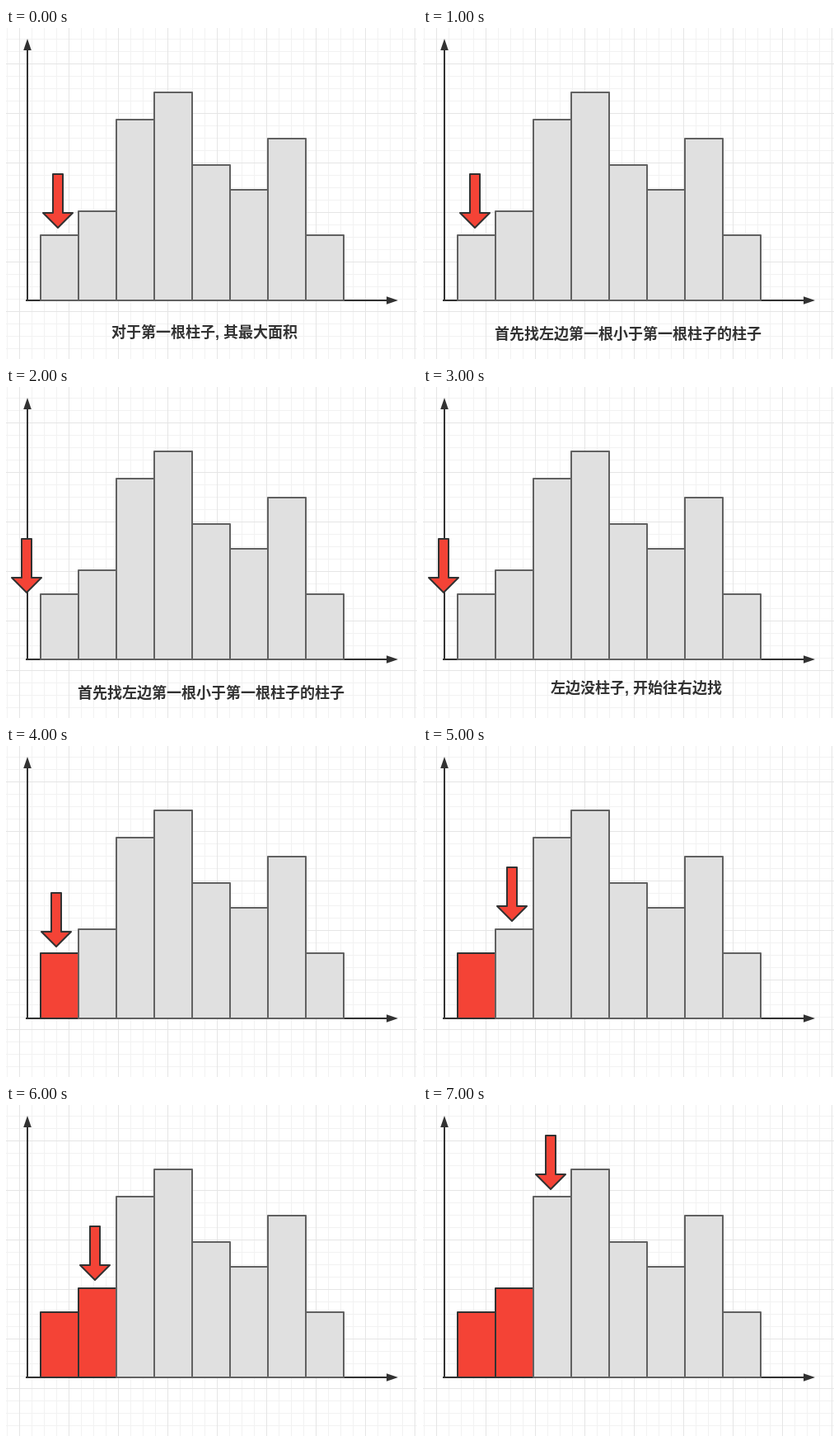
An HTML page with a canvas that plays this animation: 499 by 401 pixels, repeating every 8000 ms.

```html
<!DOCTYPE html>
<html lang="zh-CN">
<head>
<meta charset="utf-8">
<style>
  html, body { margin: 0; width: 100%; height: 100%; overflow: hidden; background: #fff; }
  canvas, svg { position: absolute; left: 0; top: 0; display: block; }
  text { font: bold 18px "Liberation Sans", "Noto Sans CJK SC", "Noto Sans CJK", sans-serif; fill: #323232; }
</style>
</head>
<body>
<canvas id="stage" width="499" height="401"></canvas>
<svg width="499" height="401"><text id="caption"></text></svg>
<script>
const W = 499, H = 401, STEP = 1000;
const INK = '#323232', EDGE = '#616161', GREY = '#e0e0e0', RED = '#f44336';
const BASE = 330, BAR_LEFT = 42, BAR_WIDTH = 46;
const barTops = [251, 222, 111, 78, 166, 196, 134, 251];

const captions = {
  intro: ['对于第一根柱子, 其最大面积', 128, 375],
  left: ['首先找左边第一根小于第一根柱子的柱子', 87, 376.5],
  right: ['左边没柱子, 开始往右边找', 155, 371],
  none: ['', 0, 0]
};

// One scene per second: arrow tip, number of red bars, caption
const scenes = [
  { tip: [63, 242], red: 0, caption: 'intro' },
  { tip: [63, 242], red: 0, caption: 'left' },
  { tip: [25, 249], red: 0, caption: 'left' },
  { tip: [25, 249], red: 0, caption: 'right' },
  { tip: [61, 243], red: 1, caption: 'none' },
  { tip: [108, 212], red: 1, caption: 'none' },
  { tip: [108, 212], red: 2, caption: 'none' },
  { tip: [155, 102], red: 2, caption: 'none' }
];

const ctx = document.getElementById('stage').getContext('2d');
const caption = document.getElementById('caption');

function polygon(points, fill, stroke) {
  ctx.beginPath();
  points.forEach(([x, y]) => ctx.lineTo(x, y));
  ctx.closePath();
  ctx.fillStyle = fill;
  ctx.fill();
  if (stroke) {
    ctx.strokeStyle = stroke;
    ctx.stroke();
  }
}

function drawGrid() {
  const lines = (first, gap, color) => {
    ctx.fillStyle = color;
    for (let x = 16 + first; x < W; x += gap) ctx.fillRect(x, 0, 1, H);
    for (let y = 43 + first; y < H; y += gap) ctx.fillRect(0, y, W, 1);
  };
  lines(-60, 15, '#f2f2f2');
  lines(-60, 60, '#e5e5e5');
}

function drawAxes() {
  ctx.fillStyle = INK;
  ctx.fillRect(25, 25, 2, 306);
  ctx.fillRect(24, 329, 440, 2);
  polygon([[26, 13], [30.8, 27], [21.2, 27]], INK);
  polygon([[476, 330], [462, 334.8], [462, 325.2]], INK);
}

function drawBars(redCount) {
  barTops.forEach((top, i) => {
    const x = BAR_LEFT + i * BAR_WIDTH, right = x + BAR_WIDTH;
    const isRed = i < redCount;
    polygon([[x, top], [right, top], [right, BASE], [x, BASE]],
      isRed ? RED : GREY, isRed ? INK : EDGE);
  });
}

function drawArrow([x, y]) {
  polygon([
    [x - 6, y - 65], [x + 6, y - 65], [x + 6, y - 18], [x + 18, y - 18],
    [x, y], [x - 18, y - 18], [x - 6, y - 18]
  ], RED, INK);
}

function draw(scene) {
  ctx.fillStyle = '#fff';
  ctx.fillRect(0, 0, W, H);
  ctx.lineWidth = 2;
  ctx.lineJoin = 'round';
  drawGrid();
  drawAxes();
  drawBars(scene.red);
  drawArrow(scene.tip);
  const [words, x, y] = captions[scene.caption];
  caption.textContent = words;
  caption.setAttribute('x', x);
  caption.setAttribute('y', y);
}

const start = performance.now();
let shown = -1;

function tick() {
  const index = Math.floor((performance.now() - start) / STEP) % scenes.length;
  if (index !== shown) {
    shown = index;
    draw(scenes[index]);
  }
  requestAnimationFrame(tick);
}
tick();
</script>
</body>
</html>
```
